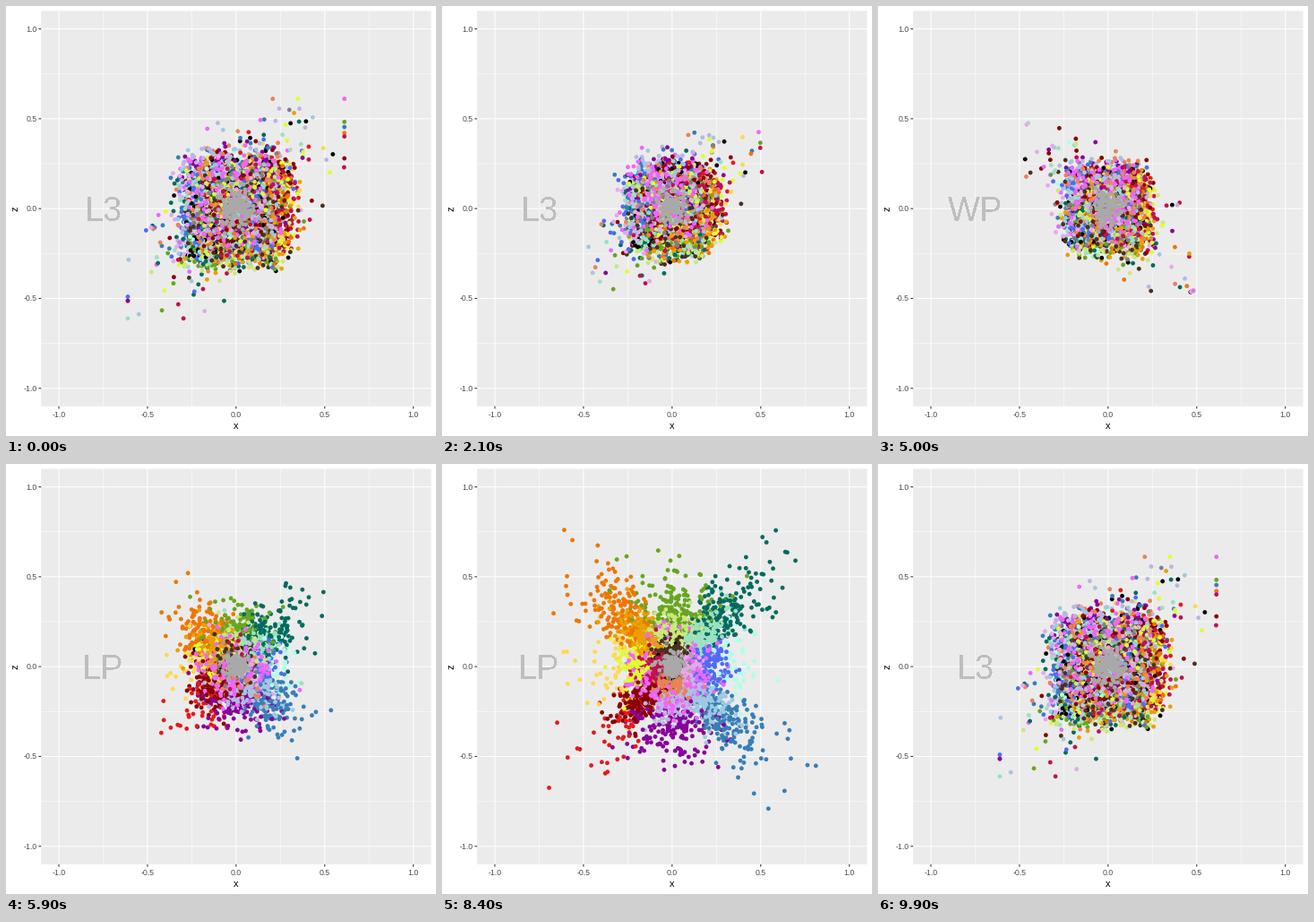
A matplotlib script that plays this animation: 480x480 px, repeating every 10000 ms.

```python
import numpy as np
import matplotlib.pyplot as plt
from matplotlib.animation import FuncAnimation

SIZE, DPI = 480, 100
PT = 72 / DPI                       # points per pixel
LEFT, RIGHT, TOP, BOTTOM = 39.2, 474.5, 5.5, 446.8
CX, CZ = (LEFT + RIGHT) / 2, (TOP + BOTTOM) / 2
UX, UZ = (RIGHT - LEFT) / 2.2, (BOTTOM - TOP) / 2.2
FONT = "Liberation Sans"
rng = np.random.default_rng(12)

# Colours of each ring, anticlockwise from the right
OUTER = ["#AFFFEA", "#006B5E", "#66A61E", "#EE7600",
         "#FFD94D", "#E41A1C", "#880099", "#377EB8"]
MIDDLE = ["#4F6BF5", "#99E2C0", "#CBE87B", "#EBA000",
          "#DEFF2E", "#8B0000", "#B9B6E0", "#9ECAE1"]
INNER = ["#E6A8EB", "#4A3020", "#C2104F", "#E98355"]
RARE = {"#AFFFEA", "#FFD94D", "#E41A1C"}
VIOLET, BLACK, GREY, SILVER = "#EE66FF", "#000000", "#808080", "#A9A9A9"


def bell(n, limit=2.5):
    return np.clip(rng.normal(size=n), -limit, limit)


def polar(angle, radius):
    return np.column_stack([radius * np.cos(angle), radius * np.sin(angle)])


def spoke(n, angle, turn, radius, spread):
    return polar(angle + np.radians(turn) * bell(n, 2),
                 radius * np.exp(spread * bell(n)))


def cloud(n, centre, half, tilt):
    """Squarish cloud with a few points drawn out along one diagonal."""
    p = centre + half * np.tanh(rng.normal(size=(n, 2)))
    p += rng.normal(0, .18 * half, (n, 2))
    reach = .55 * half * rng.laplace(size=n) * (rng.random(n) < .12)
    return np.clip(p + np.outer(reach, [1, tilt]), -2.6 * half, 2.6 * half)


groups = []


def add(colour, lp, angle=None, depth=0.0):
    """Store one class: its three states, its colour and drawing order."""
    n = len(lp)
    centre = np.zeros(2) if angle is None else -polar(angle, .065)[0]
    if colour == SILVER:
        l3, wp = rng.normal(0, .055, (n, 2)), rng.normal(0, .045, (n, 2))
    else:
        l3, wp = cloud(n, centre, .235, .95), cloud(n, centre, .19, -.95)
    groups.append((l3, wp, lp, [colour] * n, rng.random(n) + depth))


def add_ring(colours, n, radius, turn, spread, depth):
    for k, colour in enumerate(colours):
        angle = 2 * np.pi * k / len(colours)
        diagonal = abs(np.sin(2 * angle))
        count = n // 3 if colour in RARE else n
        add(colour, spoke(count, angle, turn * (1 - .5 * diagonal),
                          radius * (1 + .25 * diagonal),
                          spread * (1 + .2 * diagonal)), angle, depth)


add_ring(OUTER, 185, .37, 20, .27, 0)
add_ring(MIDDLE, 200, .215, 19, .24, .1)
add_ring(INNER, 180, .12, 28, .3, .2)
add(VIOLET, spoke(200, np.radians(-60), 85, .21, .22), np.radians(-60), .4)
add(BLACK, rng.normal(0, .045, (260, 2)))
add(GREY, rng.normal(0, .045, (120, 2)), depth=.2)
add(SILVER, rng.normal(0, .035, (150, 2)), depth=.75)

*STATES, COLOURS, depths = map(np.concatenate, zip(*groups))
order = np.argsort(depths)
COLOURS = COLOURS[order]
STATES = [np.array([CX, CZ]) + s[order] * [UX, -UZ] for s in STATES]
LABELS = ["L3", "WP", "LP"]
MOVES = [(16, 33), (49, 66), (83, 99)]

fig = plt.figure(figsize=(SIZE / DPI, SIZE / DPI), dpi=DPI, facecolor="white")
ax = fig.add_axes([0, 0, 1, 1])
ax.set_xlim(0, SIZE)
ax.set_ylim(SIZE, 0)
ax.axis("off")
ax.add_patch(plt.Rectangle((LEFT, TOP), RIGHT - LEFT, BOTTOM - TOP,
                           fc="#EBEBEB", lw=0, zorder=0, snap=False))


def line(xs, ys, width, colour="white"):
    ax.plot(xs, ys, color=colour, lw=width * PT, zorder=1, snap=False,
            solid_capstyle="butt")


def write(x, y, s, size, colour, **kw):
    kw = {"ha": "center", "va": "baseline", **kw}
    return ax.text(x, y, s, fontsize=size * PT, color=colour, family=FONT, **kw)


for v in (-.75, -.25, .25, .75):
    line([CX + UX * v] * 2, [TOP, BOTTOM], .53)
    line([LEFT, RIGHT], [CZ - UZ * v] * 2, .53)
for v in (-1, -.5, 0, .5, 1):
    x, y = CX + UX * v, CZ - UZ * v
    line([x, x], [TOP, BOTTOM], 1.07)
    line([LEFT, RIGHT], [y, y], 1.07)
    line([x, x], [BOTTOM, BOTTOM + 2.75], 1.07, "#333333")
    line([LEFT - 2.75, LEFT], [y, y], 1.07, "#333333")
    write(x, 459, f"{v:.1f}", 8.8, "#4D4D4D")
    write(34.3, y + 3, f"{v:.1f}", 8.8, "#4D4D4D", ha="right")
write(CX, 472, "x", 11, "black")
write(13, CZ, "z", 11, "black", rotation=90, rotation_mode="anchor")

dots = ax.scatter(*STATES[0].T, s=(4.8 * PT) ** 2, c=COLOURS, linewidths=0,
                  zorder=3)
label = write(CX - .75 * UX, 239.5, "L3", 38, "#BEBEBE", zorder=4,
              antialiased=False)


def draw(frame):
    now, nxt, t = 0, 0, 0
    for k, (start, end) in enumerate(MOVES):
        if frame >= start:
            now, nxt = k, (k + 1) % 3
            t = min(1, (frame - start) / (end - start))
    dots.set_offsets(STATES[now] * (1 - t) + STATES[nxt] * t)
    label.set_text(LABELS[nxt if t >= .5 else now])
    return dots, label


anim = FuncAnimation(fig, draw, frames=100, interval=100, repeat=True,
                     repeat_delay=0)
plt.show()
```
